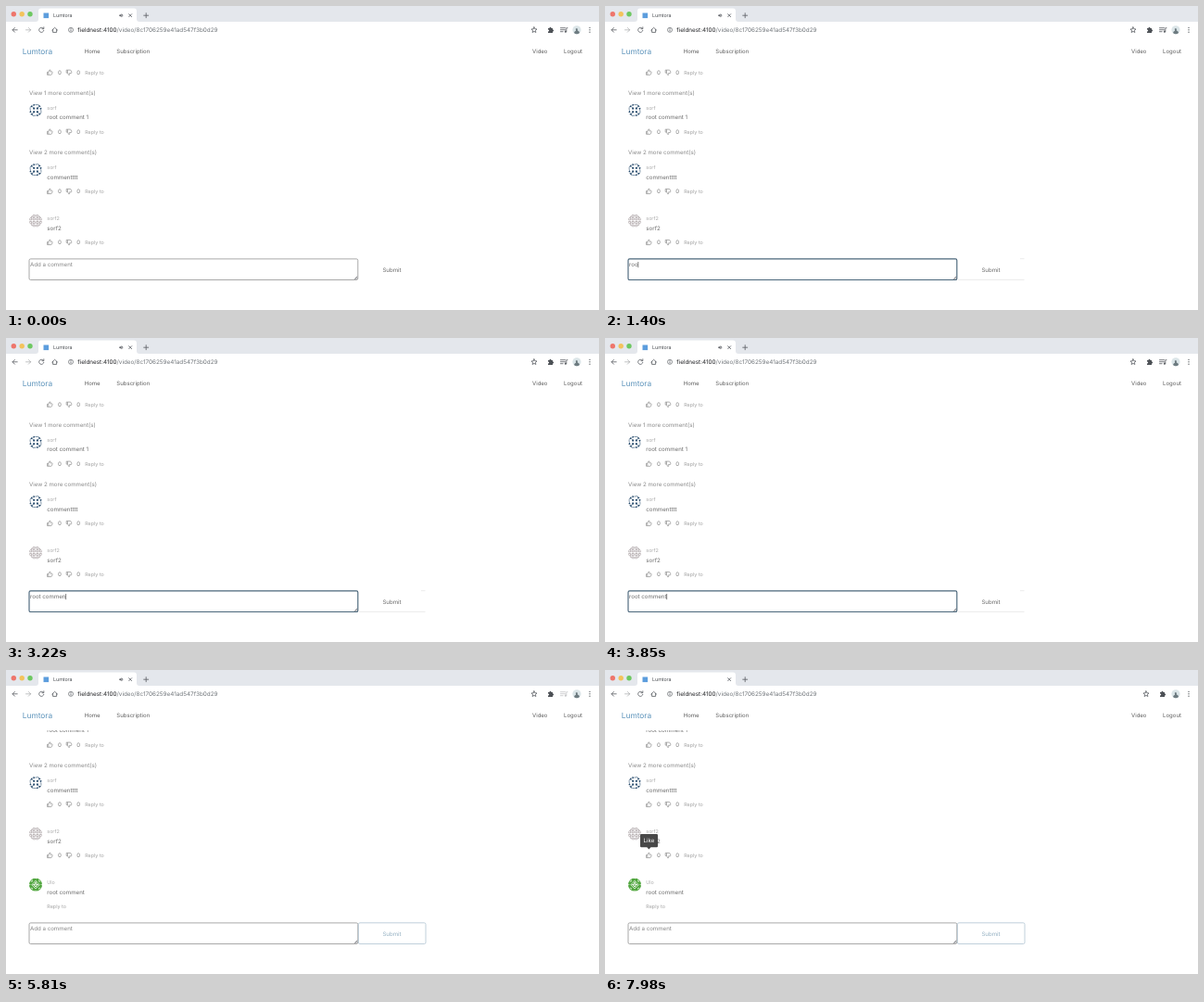
Write an HTML page that moves like this. It is 640 px wide and 328 px high and loops after 8 s.

```html
<!DOCTYPE html>
<html lang="en">
<head>
<meta charset="utf-8">
<title>Comment page</title>
<style>
html, body { margin: 0; height: 100%; overflow: hidden; background: #fff; }
svg { display: block; width: 100vw; height: 100vh; }
text { font: 6.15px Inter, "Open Sans", sans-serif; white-space: pre; text-rendering: geometricPrecision; }
.line { fill: none; stroke: #5f6368; stroke-width: .85; stroke-linecap: round; stroke-linejoin: round; }
.thumb { fill: none; stroke: #858585; stroke-width: .65; stroke-linejoin: round; }
</style>
</head>
<body>
<svg id="stage" viewBox="0 0 640 328"></svg>
<script>
const LOOP = 8000, FOCUS = 140, BLUR = 4410, POST = 5810, MUTED = 6930, HOVER = 7490;
const DRAFT = 'root comment';
const KEYS = [910, 1120, 1330, 1540, 1820, 2100, 2380, 2590, 2800, 2940, 3220, 3430];

// y is the middle of the line of text
const text = (x, y, s, fill = '#6a6a6a', size = 6.15, more = '') =>
  `<text x="${x}" y="${y + size * .36}" fill="${fill}" style="font-size:${size}px" ${more}>${s}</text>`;
const line = (d, more = '') => `<path class="line" d="${d}" ${more}/>`;
const at = (x, y, body, more = '') => `<g transform="translate(${x} ${y}) ${more}">${body}</g>`;
const dot = (x, y, r, fill, more = '') => `<circle cx="${x}" cy="${y}" r="${r}" fill="${fill}" ${more}/>`;

const THUMB = '<path class="thumb" d="M-2.8-.4h1.3v3h-1.3zM-1.5-.4L-.3-2.8q1.2-.2 1 1l-.2 1h1.8q.8.2.5 1l-.7 1.8q-.2.6-.8.6h-2.8"/>';

// one quarter of the badge, turned four times
const quarters = body => [0, 90, 180, 270].map(a => `<g transform="rotate(${a})">${body}</g>`).join('');
const badges = {
  navy: quarters(`<path fill="#24486a" d="M.9-.9v-1.9h1.9v1.9zM-2.6-6.8l2.4 1.1-2.3 1.4zM3.2-6.2l2.7 2.4-2.6.4z"/>
    <path fill="none" stroke="#24486a" stroke-width=".6" d="M-.2-5.7L3.3-6.2M3.3-3.4L1.9-1.9"/>`),
  grey: quarters(`<path fill="none" stroke="#aaa1a3" stroke-width=".75" d="M.8-.8v-2.2h2.2v2.2zM.8-4.4v-2h2l.6 2zM4.4-.8h2v-2l-2-.6z"/>
    <path fill="#aaa1a3" d="M4-5.4l1.4 1.4-1.5.3z"/>`),
  green: quarters(`<path fill="#51a63f" d="M0-7H3L6-5 7-2.8V0H4.6L0-4.6z"/>
    <path fill="#51a63f" d="M0-.8L2.6-2.8.8 0z"/>
    <path fill="#cfe8c6" d="M3.4-5.4l2 2-1.4.4-1-1zM-.9-7h1.8L0-5.6z"/>
    <path fill="none" stroke="#51a63f" stroke-width="1" d="M0-3.4L3.4 0"/>`)
};

const actions = y => at(47.3, y, THUMB) + text(56, y, '0', '#858585') +
  at(68, y, THUMB, 'scale(1 -1)') + text(76.3, y, '0', '#858585') + text(85.2, y, 'Reply to', '#a0a0a0', 5.4);
const comment = (y, badge, name, body, buttons = actions(y + 23)) =>
  at(32, y - .3, `<g clip-path="url(#round)">${badges[badge]}</g>`) +
  text(44.3, y - 3, name, '#aaa', 5.4) + text(44.3, y + 7.4, body) + buttons;
const more = (y, n) => text(25, y, `View ${n} more comment(s)`, '#888');

const browser = `
  <path fill="#e4e7ec" d="M0 0h640v17H0z"/>
  <path fill="#fff" d="M32 17q3 0 3-3V5.5q0-3 3-3h100q3 0 3 3v8.5q0 3 3 3z"/>
  ${dot(8.3, 8.7, 2.7, '#ee756b')}${dot(17.2, 8.7, 2.7, '#f3c35c')}${dot(26, 8.7, 2.7, '#6dc861')}
  <rect x="40.5" y="7.5" width="5.6" height="5.6" fill="#5c9ddd"/>
  ${text(51, 10.2, 'Lumtora', '#45494d', 5.3)}
  <g id="sound"><path fill="#5f6368" d="M122.3 9.4h1l1.3-1.2v4l-1.3-1.2h-1z"/>${line('M125.6 9.2q.7 1 0 2', 'stroke-width=".6"')}</g>
  ${line('M132.7 8.7l3 3M135.7 8.7l-3 3')}
  ${line('M148.7 10.2h5M151.2 7.7v5')}
  ${line('M12.2 25.8h-5M9.4 23.4L7 25.8l2.4 2.4')}
  ${line('M21.5 25.8h5M24.3 23.4l2.4 2.4-2.4 2.4', 'opacity=".45"')}
  ${line('M40.3 24.2a2.6 2.6 0 1 0 .5 2.2M40.8 22.8v1.9h-1.9')}
  ${line('M49.7 26l2.9-2.7 2.9 2.7M50.6 25.4v3h4v-3')}
  ${dot(70, 25.8, 2.5, 'none', 'stroke="#5f6368" stroke-width=".7"')}${line('M70 25.7v1.2M70 24.4v.05', 'stroke-width=".7"')}
  ${text(77.3, 25.8, 'fieldnest:4100<tspan fill="#70757a">/video/8c1706259e41ad547f3b0d29</tspan>', '#202124', 6.35)}
  <g id="tools">
    ${line('M570 22.8l.9 2 2.1.2-1.6 1.4.5 2.1-1.9-1.1-1.9 1.1.5-2.1-1.6-1.4 2.1-.2z', 'stroke-width=".7"')}
    <path fill="#4d5156" d="M585 24h1.5q0-1.3 1-1.3t1 1.3h1.5v1.5q1.2 0 1.2 1t-1.2 1v1.5h-5v-1.5q1.2 0 1.2-1t-1.2-1z"/>
  </g>
  <g id="media">${line('M598.5 23.7h5M598.5 25.7h5M598.5 27.7h2.6M604.8 27.6v-3.9h1.2')}${dot(603.9, 27.7, 1.1, '#5f6368')}</g>
  ${dot(616, 25.8, 4.6, '#dbe5e8')}
  <path fill="#6d7b80" d="M613 28.9q.6-2 2.1-2.2-.9-2.6.7-2.8t1.1 2.7q1.6.3 2.2 2.3-3.1 2.5-6.1 0z"/>
  ${[23.4, 25.8, 28.2].map(y => dot(630, y, .7, '#5f6368')).join('')}`;

const nav = text(17.8, 49.3, 'Lumtora', '#5b92ba', 8.3) +
  [[84.7, 'Home'], [119.3, 'Subscription'], [568, 'Video'], [602, 'Logout']]
    .map(([x, s]) => text(x, 48.8, s, '#5c5c5c', 6.05)).join('');

const list = `<g clip-path="url(#page)"><g id="list">
  ${actions(71.7)}
  ${more(94, 1)}${comment(112.7, 'navy', 'sorf', 'root comment 1')}
  ${more(158.2, 2)}${comment(177, 'navy', 'sorf', 'commentttt')}
  ${comment(232, 'grey', 'sorf2', 'sorf2')}
  <g id="added">${comment(287, 'green', 'Ulo', DRAFT, text(44.3, 310, 'Reply to', '#a0a0a0', 5.4))}</g>
</g></g>`;

const form = `
  <rect id="box" x="25" y="272.9" width="354.8" height="22.6" rx="1.6" fill="#fff"/>
  ${line('M376.4 294.5l2.4-2.4M377.9 294.6l.9-.9', 'stroke-width=".45"')}
  ${text(26, 279, '', '#6a6a6a', 6.15, 'id="draft"')}
  <rect id="caret" y="276" width=".6" height="6.2" fill="#333"/>
  <path id="faint" fill="none" stroke="#e6e6e6" stroke-width=".8" d="M381 295.4h71.5M448 272.7h4.5"/>
  <rect id="frame" x="380.4" y="272.8" width="72.6" height="22.7" rx="1.6" fill="none" stroke="#b0c5d2" stroke-width=".8"/>
  ${text(406.4, 284.4, 'Submit', '#6a6a6a', 6.15, 'id="submit"')}`;

const tip = `<g id="tip">
  <path fill="#484848" d="M39.2 177h16.6q1.2 0 1.2 1.2v11.9q0 1.2-1.2 1.2H49.5L47.4 193.6 45.3 191.3H39.2q-1.2 0-1.2-1.2v-11.9q0-1.2 1.2-1.2z"/>
  ${text(41.6, 184.2, 'Like', '#fff')}</g>`;

const $ = id => document.getElementById(id);
const set = (id, attrs) => { for (const k in attrs) $(id).setAttribute(k, attrs[k]); };
const show = (id, on) => set(id, { opacity: +on });
const ramp = (t, from, span) => Math.min(1, Math.max(0, (t - from) / span));

$('stage').innerHTML = `<defs>
  <clipPath id="round"><circle r="7.1"/></clipPath>
  <clipPath id="page"><path d="M0 65h640v206H0z"/></clipPath></defs>` + browser + nav + list + form + tip;

function draw(now) {
  const t = now % LOOP;
  const focused = t >= FOCUS && t < BLUR, posted = t >= POST, muted = t >= MUTED;

  const typed = posted ? 0 : KEYS.filter(k => k <= t).length;
  const draft = $('draft');
  draft.textContent = typed ? DRAFT.slice(0, typed) : 'Add a comment';
  set('draft', { fill: typed ? '#6a6a6a' : '#858585' });
  const sinceKey = t - (typed ? KEYS[typed - 1] : FOCUS);
  set('caret', { x: 26 + (typed ? draft.getComputedTextLength() : -.3) });
  show('caret', focused && sinceKey % 1000 < 500);
  set('box', { stroke: focused ? '#4b677b' : '#8c8c8c', 'stroke-width': focused ? 1.15 : .75 });

  const hot = ramp(t, BLUR, 140);
  show('faint', focused);
  set('frame', { opacity: hot });
  set('submit', { fill: hot > .4 ? '#94b0c2' : '#6a6a6a' });

  set('list', { transform: `translate(0 ${posted ? -55 : 0})` });
  show('added', posted);

  show('sound', !muted);
  set('media', { opacity: muted ? 0 : t < BLUR ? 1 : .35 });
  set('tools', { transform: `translate(${muted ? 14 : 0} 0)` });

  const grow = 1 - (1 - ramp(t, HOVER, 140)) ** 2;
  set('tip', { opacity: grow, transform: `translate(47.4 193.6) scale(${.8 + .2 * grow}) translate(-47.4 -193.6)` });
}

function tick() {
  draw(performance.now());
  requestAnimationFrame(tick);
}
tick();
</script>
</body>
</html>
```
